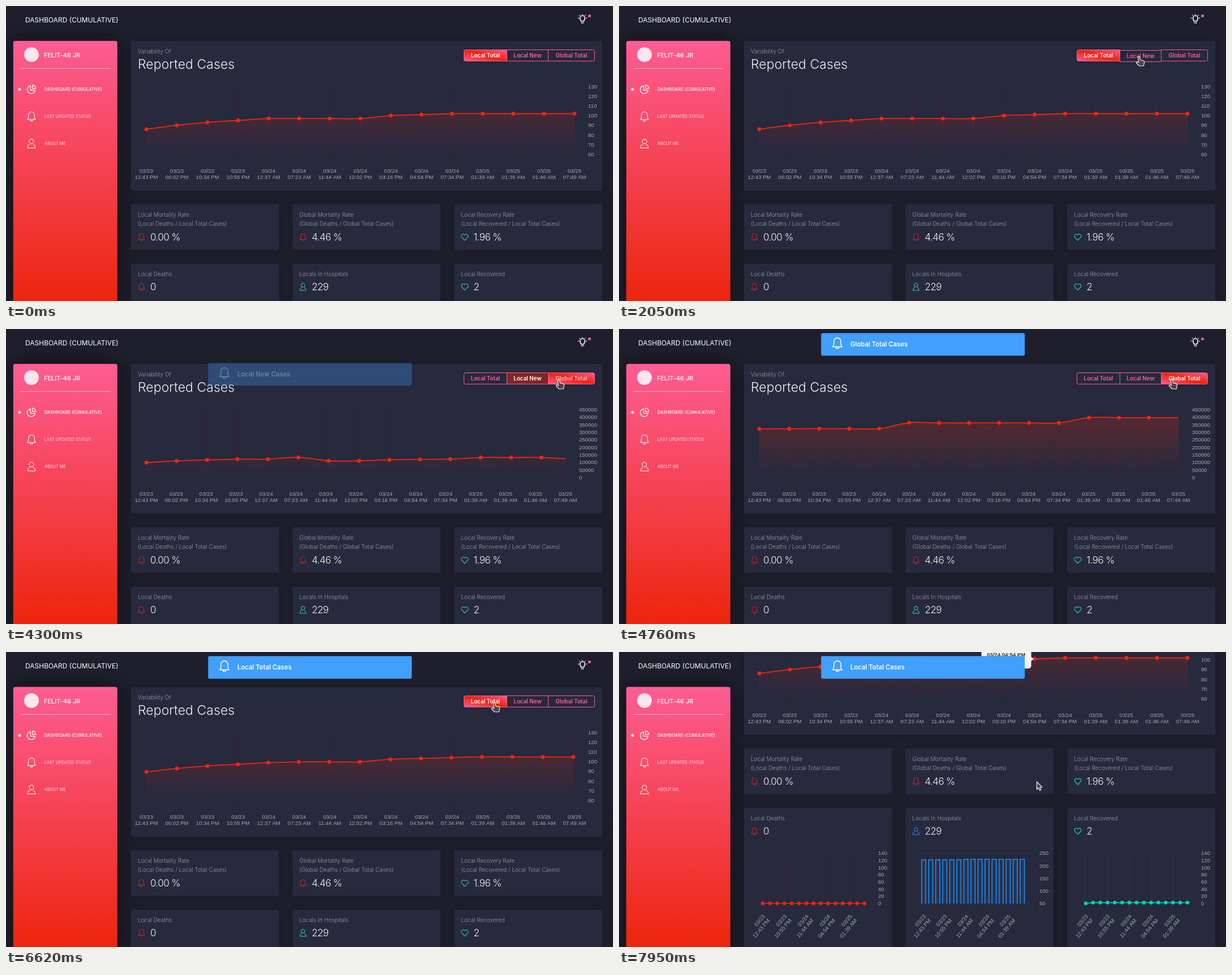
Animation, 1073 px wide and 522 px high, one loop 8 s. Source, as an HTML page with a canvas:

```html
<!DOCTYPE html>
<html lang="en">
<head>
<meta charset="utf-8">
<title>Dashboard</title>
<style>
html, body { margin: 0; width: 100%; height: 100%; overflow: hidden; background: #1e1e2c; }
canvas { display: block; }
</style>
</head>
<body>
<canvas id="stage" width="1073" height="522"></canvas>
<script>
const W = 1073, H = 522, LOOP = 8000, STEP = 77.4;
const g = document.getElementById('stage').getContext('2d');
const SANS = 'Inter, "Open Sans", sans-serif';
const ARIAL = '"Liberation Sans", Arial, sans-serif';
const RED = '#f0250f', PINK = '#fd5d93', CARD = '#27293d', BLUE = '#1f8ef1';
const AXIS = '#a8a8ad', MUTED = '#9b9ca7';

const clamp = v => Math.max(0, Math.min(1, v));
const mix = (a, b, p) => a + (b - a) * p;
const smooth = p => p * p * (3 - 2 * p);
const outQuart = p => 1 - (1 - p) ** 4;

// ---------- data ----------
const dates = ['03/23', '03/24', '03/25'];
const labels = ['12:43 PM', '06:02 PM', '10:34 PM', '10:55 PM', '12:37 AM', '07:23 AM', '11:44 AM', '12:02 PM',
  '03:16 PM', '04:54 PM', '07:34 PM', '01:39 AM', '01:39 AM', '01:46 AM', '07:49 AM']
  .map((time, i) => [dates[i < 4 ? 0 : i < 11 ? 1 : 2], time]);

const modes = [
  { name: 'Local Total', bx: 809.5, bw: 76, end: 1005, lx: 1029, min: 60, max: 130, tick: 10,
    data: [86, 90, 93, 95, 97, 97, 97, 97, 100, 101, 102, 102, 102, 102, 102] },
  { name: 'Local New', bx: 885.5, bw: 73, end: 1005, lx: 1029, min: 0, max: 140, tick: 20,
    data: [0, 5, 8, 10, 10, 10, 0, 0, 3, 4, 5, 5, 5, 5, 0] },
  { name: 'Global Total', bx: 958.5, bw: 82, end: 989, lx: 1013, min: 0, max: 450000, tick: 50000,
    data: labels.map((_, i) => i < 5 ? 336000 : i < 11 ? 377000 : 413000) }
];
const TOP = 142.5, BASE = 262.5, LEFT = 248;
const clicks = [
  { at: -9999, mode: 0 }, { at: 2112, down: 1805, mode: 1 },
  { at: 4212, down: 3975, mode: 2 }, { at: 6216, down: 6085, mode: 0 }
];
const path = [[40, 983, 469], [560, 930, 254], [700, 930, 254], [1430, 919, 90], [2640, 919, 90], [3056, 977, 90],
  [5360, 977, 90], [5680, 863, 90], [6860, 863, 90], [7155, 738, 229], [LOOP, 738, 229]];

// ---------- helpers ----------
function text(str, x, y, size, color, weight = 400, align = 'left', family = SANS, spacing = 0) {
  g.font = `${weight} ${size}px ${family}`;
  g.fillStyle = color;
  g.textAlign = align;
  g.letterSpacing = spacing + 'px';
  g.fillText(str, x, y);
}
const tag = (str, x, y, align = 'left', color = AXIS, weight = 400) =>
  text(str, x, y + 3.4, 9.6, color, weight, align, ARIAL);

function box(x, y, w, h, r, fill, stroke) {
  g.beginPath();
  g.roundRect(x, y, w, h, r);
  if (fill) { g.fillStyle = fill; g.fill(); }
  if (stroke) { g.strokeStyle = stroke; g.lineWidth = 1; g.stroke(); }
}
function dot(x, y, r, fill) {
  g.beginPath();
  g.arc(x, y, r, 0, 7);
  g.fillStyle = fill;
  g.fill();
}
function line(x1, y1, x2, y2, color, width = 1) {
  g.beginPath();
  g.moveTo(x1, y1);
  g.lineTo(x2, y2);
  g.strokeStyle = color;
  g.lineWidth = width;
  g.stroke();
}
function shadowed(blur, alpha, draw) {
  g.save();
  g.shadowBlur = blur;
  g.shadowColor = `rgba(0,0,0,${alpha})`;
  draw();
  g.restore();
}
const card = (x, y, w, h) => shadowed(16, 0.14, () => box(x, y, w, h, 3, CARD));

// Icons fill a 20 unit square around the origin.
const icons = {
  bell: 'M-8 6C-5 3-6 0-6-3A6 6 0 0 1 6-3C6 0 5 3 8 6ZM-2.5 6.5A2.5 2.7 0 0 0 2.5 6.5M0-9V-10',
  person: 'M-4.5-4.5a4.5 4.8 0 1 0 9 0a4.5 4.8 0 1 0-9 0M-3.5 2C-7.5 3-8 5-8 9H8C8 5 7.5 3 3.5 2',
  heart: 'M0 8.5L-8 0A4.8 4.8 0 0 1 0-5.5A4.8 4.8 0 0 1 8 0Z',
  pie: 'M-2-7.5A8.2 8.2 0 1 0 7.5 2H-2ZM2-9V-2H9.2A7.4 7.4 0 0 0 2-9Z',
  bulb: 'M-3 5C-3 3-5.5 1.5-5.5-2A5.5 5.5 0 0 1 5.5-2C5.5 1.5 3 3 3 5ZM-3 8.5H3M-10-2H-8.2M8.2-2H10M0-10.5V-9M-7-9L-5.8-7.8M7-9L5.8-7.8'
};
for (const k in icons) icons[k] = new Path2D(icons[k]);
const arrow = new Path2D('M0.5 0.5V14L3.4 11.4L5.6 16L8 15L6 10.6L10 10.2Z');
const hand = new Path2D('M-1.6 1A1.5 1.5 0 0 1 1.4 0.6L2.6 5.6L8 7Q10 7.6 9.6 9.6L8.4 16H0.6L-4.6 10.6Q-4.8 8.6-2.6 9L-0.4 10Z');

function stamp(shape, x, y, scale, stroke, width, fill) {
  g.save();
  g.translate(x, y);
  g.scale(scale, scale);
  g.lineWidth = width / scale;
  g.lineJoin = 'round';
  if (fill) { g.fillStyle = fill; g.fill(shape); }
  g.strokeStyle = stroke;
  g.stroke(shape);
  g.restore();
}
const icon = (name, x, y, size, color, width = 1.3) => stamp(icons[name], x, y, size / 20, color, width);

// ---------- state ----------
function cursorAt(t) {
  let i = 1;
  while (i < path.length - 1 && path[i][0] < t) i++;
  const [t0, x0, y0] = path[i - 1], [t1, x1, y1] = path[i];
  const p = smooth(clamp((t - t0) / (t1 - t0)));
  return { x: mix(x0, x1, p), y: mix(y0, y1, p) };
}
function place(mode) {
  const gap = (mode.end - LEFT) / 14;
  return mode.data.map((v, i) => ({
    x: LEFT + gap * i,
    y: BASE - (v - mode.min) / (mode.max - mode.min) * (BASE - TOP)
  }));
}
function stateAt(t) {
  let n = 0;
  while (n < clicks.length - 1 && clicks[n + 1].at <= t) n++;
  const dt = t - clicks[n].at;
  const mode = modes[clicks[n].mode], before = n ? modes[clicks[n - 1].mode] : mode;
  const p = outQuart(clamp(dt / 1000)), from = place(before);
  const points = place(mode).map((b, i) => ({ x: mix(from[i].x, b.x, p), y: mix(from[i].y, b.y, p) }));
  const next = clicks[n + 1];
  const pressed = next && t >= next.down ? modes[next.mode] : null;
  return { n, dt, mode, before, points, pressed, cur: cursorAt(t) };
}

// ---------- main chart ----------
function curve(pts) {
  const cap = y => Math.max(TOP, Math.min(BASE, y));
  const ctl = pts.map((c, i) => {
    const a = pts[i - 1] || c, b = pts[i + 1] || c;
    const d0 = Math.hypot(c.x - a.x, c.y - a.y), d1 = Math.hypot(b.x - c.x, b.y - c.y);
    const k0 = 0.4 * d0 / (d0 + d1), k1 = 0.4 * d1 / (d0 + d1), dx = b.x - a.x, dy = b.y - a.y;
    return { ax: c.x - k0 * dx, ay: cap(c.y - k0 * dy), bx: c.x + k1 * dx, by: cap(c.y + k1 * dy) };
  });
  g.beginPath();
  g.moveTo(pts[0].x, pts[0].y);
  for (let i = 1; i < pts.length; i++)
    g.bezierCurveTo(ctl[i - 1].bx, ctl[i - 1].by, ctl[i].ax, ctl[i].ay, pts[i].x, pts[i].y);
}

function chart({ mode, points }) {
  const gap = (mode.end - LEFT) / 14;
  labels.forEach(([day, time], i) => {
    const x = LEFT + gap * i;
    line(x, TOP, x, 272, 'rgba(225,20,20,.12)', 0.9);
    tag(day, x, 292, 'center');
    tag(time, x, 303, 'center');
  });
  const count = (mode.max - mode.min) / mode.tick;
  for (let i = 0; i <= count; i++)
    tag(String(mode.max - i * mode.tick), mode.lx, TOP + i * (BASE - TOP) / count);

  g.save();
  g.beginPath();
  g.rect(LEFT - 4, TOP - 4, mode.end - LEFT + 4.5, BASE - TOP + 8);
  g.clip();
  const shade = g.createLinearGradient(0, 170, 0, 258);
  shade.addColorStop(0, 'rgba(236,37,13,.21)');
  shade.addColorStop(1, 'rgba(236,37,13,0)');
  curve(points);
  g.lineTo(points[14].x, BASE);
  g.lineTo(points[0].x, BASE);
  g.fillStyle = shade;
  g.fill();
  curve(points);
  g.strokeStyle = RED;
  g.lineWidth = 1.8;
  g.stroke();
  g.restore();
  for (const p of points) if (p.x < mode.end + 0.6) dot(p.x, p.y, 3.4, RED);
}

function tooltip({ mode, points, cur }) {
  if (cur.y < TOP || cur.y > 266) return;
  const far = p => Math.hypot(p.x - cur.x, p.y - cur.y);
  const i = points.reduce((best, p, k) => far(p) < far(points[best]) ? k : best, 0);
  const { x, y } = points[i], left = x - 94;
  box(left, y - 17, 88, 34, 5, '#f5f5f5');
  g.beginPath();
  g.moveTo(x - 6, y - 4);
  g.lineTo(x - 2, y);
  g.lineTo(x - 6, y + 4);
  g.fill();
  tag(labels[i].join(), left + 9.6, y - 7.5, 'left', '#333', 700);
  tag('Cases: ' + mode.data[i], left + 9.6, y + 7, 'left', '#666');
}

function buttons({ n, dt, mode, before, pressed, cur }) {
  modes.forEach((m, i) => {
    const active = m === mode;
    const hover = cur.y < 98 && cur.x > m.bx && cur.x < m.bx + m.bw;
    const y = 77.5 + (m === pressed ? 1 : hover && !active ? -1 : 0);
    const r = i === 0 ? [3, 0, 0, 3] : i === 2 ? [0, 3, 3, 0] : 0;
    const w = m.bw, h = 20, fade = n && m === before ? clamp(1 - dt / 150) : 0;
    let color = PINK;
    if (active) {
      // Corner to corner: the red band runs along the falling diagonal.
      const k = 2 * w * h / (w * w + h * h);
      const fill = g.createLinearGradient(m.bx + w, y, m.bx + w - h * k, y + w * k);
      fill.addColorStop(0, PINK);
      fill.addColorStop(0.5, '#ec250d');
      fill.addColorStop(1, PINK);
      shadowed(5, 0.35, () => box(m.bx, y, w, h, r, fill));
      const p = clamp(dt / 150);
      color = `rgb(${mix(253, 255, p)},${mix(93, 255, p)},${mix(147, 255, p)})`;
    } else if (fade) {
      box(m.bx, y, w, h, r, `rgba(236,37,13,${fade})`);
      color = '#fff';
    }
    box(m.bx, y, w, h, r, null, PINK);
    text(m.name, m.bx + w / 2, y + 13, 9.8, color, 600, 'center');
  });
}

// ---------- small cards ----------
function slanted(x, i) {
  g.save();
  g.translate(x + 2, 646);
  g.rotate(-50 * Math.PI / 180);
  tag(labels[i][0], 0, 0, 'right');
  tag(labels[i][1], 0, 11, 'right');
  g.restore();
}
function scale(x, max, tick, count) {
  for (let i = 0; i <= count; i++) tag(String(max - tick * i), x, 536 + i * 88.5 / count);
}
function miniLine(x0, color, grid, last) {
  scale(x0 + 204, 140, 20, 7);
  const px = i => x0 + i * 12.85, py = i => 624.8 - (i ? last * 0.63 : 0);
  for (let i = 0; i < 15; i += 3) {
    line(px(i), 536, px(i), 632, grid, 0.9);
    slanted(px(i), i);
  }
  g.beginPath();
  labels.forEach((_, i) => g.lineTo(px(i), py(i)));
  g.strokeStyle = color;
  g.lineWidth = 1.6;
  g.stroke();
  labels.forEach((_, i) => dot(px(i), py(i), 3.2, color));
}
function miniBars() {
  scale(743, 250, 50, 4);
  for (let i = 0; i < 5; i++) line(532, 536.5 + i * 22.1, 730, 536.5 + i * 22.1, 'rgba(29,140,248,.1)');
  for (let i = 0; i < 15; i++) {
    const x = 538.6 + i * 12.45, half = 3.7, top = i < 6 ? 547.6 : 546.7;
    g.fillStyle = 'rgba(29,140,248,.1)';
    g.fillRect(x - half, top, half * 2, 625 - top);
    g.beginPath();
    g.moveTo(x - half, 625);
    g.lineTo(x - half, top);
    g.lineTo(x + half, top);
    g.lineTo(x + half, 625);
    g.strokeStyle = BLUE;
    g.lineWidth = 1.6;
    g.stroke();
    if (i % 3 === 0) slanted(x, i);
  }
}
function stat(x, y, name, color, value) {
  icon(name, x + 18.5, y, 13.5, color, 1.2);
  text(value, x + 34, y + 6.3, 17.2, 'rgba(255,255,255,.95)', 300, 'left', SANS, -0.65);
}
const small = (str, x, y) => text(str, x, y, 9.95, MUTED, 300);

function lowerCards(scrolled) {
  const bell = '#bd2426', teal = scrolled ? '#0fcfae' : '#2fb5a0';
  const cols = [
    [221, 'Local Mortality Rate', '(Local Deaths / Local Total Cases)', '0.00 %', 'bell', bell,
      'Local Deaths', '0', 'bell', bell],
    [506.5, 'Global Mortality Rate', '(Global Deaths / Global Total Cases)', '4.46 %', 'bell', bell,
      'Locals In Hospitals', '229', 'person', scrolled ? '#2484dd' : teal],
    [792.5, 'Local Recovery Rate', '(Local Recovered / Local Total Cases)', '1.96 %', 'heart', teal,
      'Local Recovered', '2', 'heart', teal]
  ];
  for (const [x, title, sub, rate, rateIcon, rateColor, name, value, valueIcon, valueColor] of cols) {
    card(x, 350.5, 261.5, 81);
    small(title, x + 12, 372.5);
    small(sub, x + 12, 389);
    stat(x, 409, rateIcon, rateColor, rate);
    card(x, 456, 261.5, 270);
    small(name, x + 12, 477.5);
    stat(x, 497, valueIcon, valueColor, value);
  }
  if (!scrolled) return;
  miniLine(254, RED, 'rgba(225,20,20,.11)', 0);
  miniBars();
  miniLine(825, '#00d6b4', 'rgba(0,214,180,.14)', 2);
}

// ---------- fixed parts ----------
function backdrop() {
  const bg = g.createLinearGradient(0, 0, 0, H);
  bg.addColorStop(0, '#1e1e2d');
  bg.addColorStop(1, '#1e1e2a');
  g.fillStyle = bg;
  g.fillRect(0, 0, W, H);
}
function sidebar() {
  const fill = g.createLinearGradient(0, 62, 0, H);
  fill.addColorStop(0, PINK);
  fill.addColorStop(1, '#ec250d');
  shadowed(36, 0.55, () => box(12.8, 61.7, 184, 470, 4, fill));
  dot(45, 86, 13, 'rgba(255,255,255,.85)');
  text('FELIT-46 JR', 67, 90.5, 11, '#fff', 500);
  line(25, 110.5, 185, 110.5, 'rgba(255,255,255,.55)');
  dot(24, 147.5, 2.5, '#fff');
  const soft = 'rgba(255,255,255,.82)';
  icon('pie', 45, 147.5, 17, '#fff');
  icon('bell', 45, 195.5, 18, soft);
  icon('person', 45, 243.5, 17, soft);
  text('DASHBOARD (CUMULATIVE)', 68, 150.2, 7.4, '#fff', 500);
  text('LAST UPDATED STATUS', 68, 198.2, 7.1, soft);
  text('ABOUT ME', 68, 246.2, 7.15, soft);
}
function header() {
  text('DASHBOARD (CUMULATIVE)', 34, 28.5, 12, '#fff');
  icon('bulb', 1019, 23, 16, '#fff', 1.6);
  dot(1031.5, 17.5, 2.6, PINK);
}
function toast(name, y, alpha) {
  if (alpha <= 0) return;
  g.save();
  g.globalAlpha = alpha;
  box(357.3, y, 360, 40, 3, '#419ffd');
  icon('bell', 386, y + 18, 21, '#fff', 1.5);
  text(name + ' Cases', 409, y + 23.7, 11.3, '#fff', 600);
  g.restore();
}
function pointer({ x, y }) {
  if (y < 98) stamp(hand, x, y, 1, '#f1eeee', 1.2, '#4c4448');
  else stamp(arrow, x, y, 1, '#fff', 1.1, '#4c4448');
}

function draw(now) {
  // The screen refreshes about 13 times a second.
  const t = Math.floor((now + 40) / STEP) * STEP - 40;
  const s = stateAt(t);
  const scroll = Math.round(180 * clamp((t - 7640) / 288));
  const shown = now >= 70;
  if (!shown) s.cur = { x: 0, y: H };

  backdrop();
  sidebar();
  header();
  g.save();
  g.translate(0, -scroll);
  card(221, 62, 833, 264.5);
  text('Variability Of', 233, 83.5, 10, MUTED, 300);
  text('Reported Cases', 233, 111, 23.1, 'rgba(255,255,255,.92)', 300);
  chart(s);
  buttons(s);
  lowerCards(scroll > 0);
  if (s.mode === modes[0]) tooltip(s);
  g.restore();

  if (s.n > 1) toast(s.before.name, 60, 1 - s.dt / 117);
  if (s.n > 0) toast(s.mode.name, 7.2, clamp((s.dt - 83) / 240));
  if (shown) pointer(s.cur);
}

const start = performance.now();
function loop() {
  draw((performance.now() - start) % LOOP);
  requestAnimationFrame(loop);
}
loop();
</script>
</body>
</html>
```
